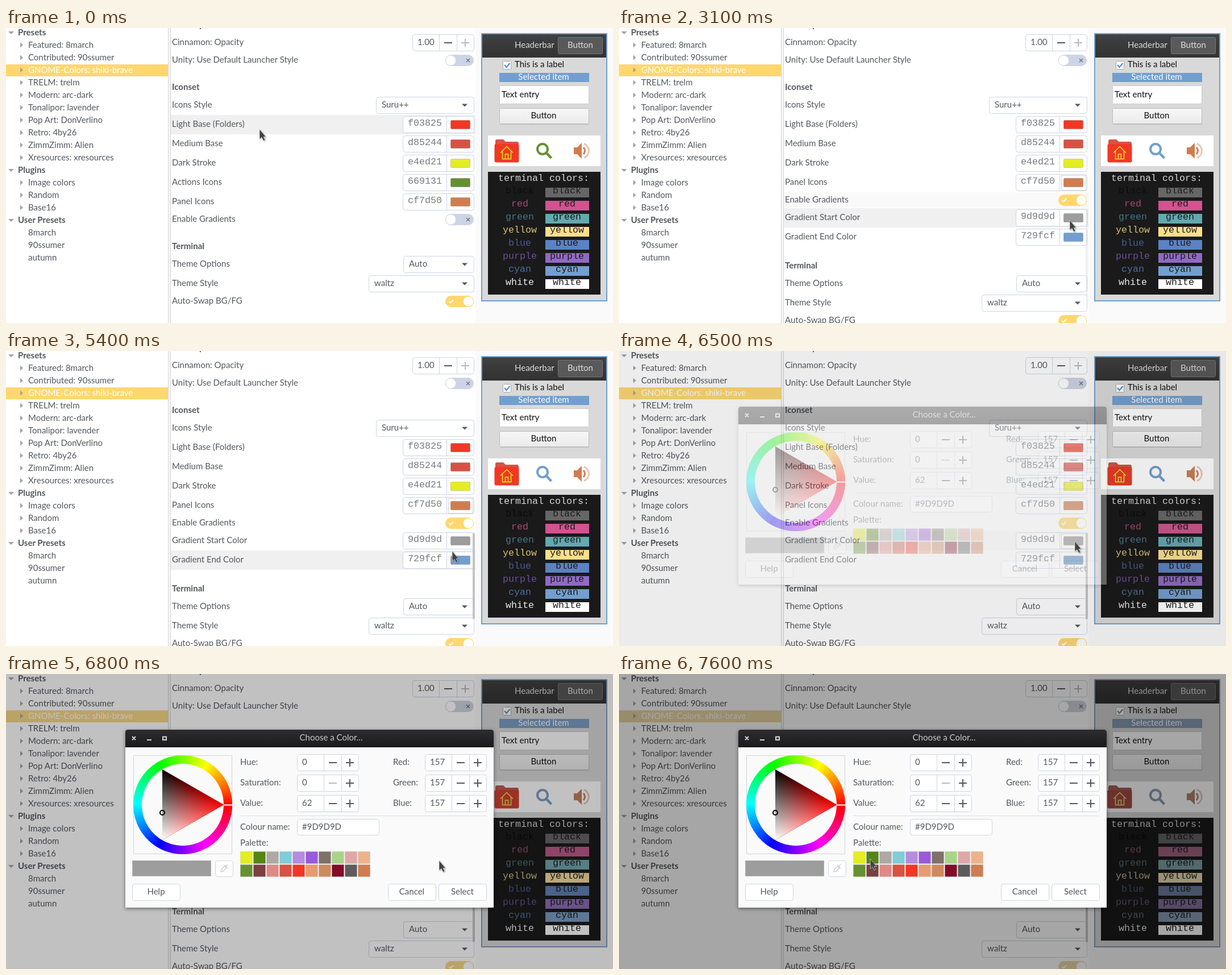
Animation, 1068 px wide and 519 px high, one loop 8000 ms. Source, as an HTML page:

```html
<!DOCTYPE html>
<html lang="en">
<head>
<meta charset="utf-8">
<title>Theme editor</title>
<style>
html, body { margin: 0; width: 100%; height: 100%; overflow: hidden; background: #fff; }
svg { display: block; width: 100vw; height: 100vh; }
text { font: 15px Lato, sans-serif; fill: #54585f; white-space: pre; }
.bold { font-weight: 700; }
.mono { font: 16.67px 'Liberation Mono', monospace; }
.mid { text-anchor: middle; }
#dialog { filter: drop-shadow(0 2px 3px #0007); }
.mix { isolation: isolate; }
.mix :last-child { mix-blend-mode: screen; }
</style>
</head>
<body>
<svg viewBox="0 0 1068 519">
  <defs>
    <linearGradient id="header" x2="0" y2="1"><stop stop-color="#414141"/><stop offset="1" stop-color="#323232"/></linearGradient>
    <linearGradient id="title" x2="0" y2="1"><stop stop-color="#2d2d2f"/><stop offset="1" stop-color="#1b1b1d"/></linearGradient>
    <linearGradient id="button" x2="0" y2="1"><stop stop-color="#f6f6f6"/><stop offset="1" stop-color="#ebebeb"/></linearGradient>
    <linearGradient id="notBlack" gradientUnits="userSpaceOnUse" x1="275" y1="168" x2="329" y2="261"><stop stop-color="#000"/><stop offset="1" stop-color="#f00"/></linearGradient>
    <linearGradient id="white" gradientUnits="userSpaceOnUse" x1="329" y1="199" x2="275" y2="292"><stop stop-color="#000"/><stop offset="1" stop-color="#0ff"/></linearGradient>
  </defs>
  <g id="window"></g>
  <g id="dialog"></g>
  <path id="cursor" d="M0 0V17.5L4 14.5L7 20.5L10 19L7.200 13.500H11.500Z" fill="#434343" stroke="#fff" stroke-opacity=".75" stroke-width=".8" style="filter:drop-shadow(1px 1px 1px #0005)"/>
</svg>
<script>
const LOOP = 8000, STEP = 100, BORDER = '#cdd4e5', ACCENT = '#ffd76e', INK = '#54585f';

// Text is placed by the middle of its capitals.
const text = (x, y, s, cls = '', fill = '') =>
  `<text x="${x}" y="${y + 5}" class="${cls}"${fill && ` style="fill:${fill}"`}>${s}</text>`;
const rect = (x, y, w, h, fill, more = '') =>
  `<rect x="${x}" y="${y}" width="${w}" height="${h}" fill="${fill}" ${more}/>`;
const path = (d, stroke, width = 1, more = '') =>
  `<path d="${d}" fill="none" stroke="${stroke}" stroke-width="${width}" ${more}/>`;
const shape = (d, fill) => `<path d="${d}" fill="${fill}"/>`;
const box = (x, y, w, h = 29) => rect(x + .5, y + .5, w - 1, h, '#fff', `rx="4" stroke="${BORDER}"`);

function spin(x, y, value, minus = INK, plus = INK) {
  return box(x, y, 109) + text(x + 9, y + 14, value)
    + path(`M${x + 47.5} ${y + 1}v28m31 0v-28`, BORDER)
    + path(`M${x + 56} ${y + 15}h14`, minus, 2)
    + path(`M${x + 86} ${y + 15}h14m-7-7v14`, plus, 2);
}

function toggle(y, on) {
  const knob = `<circle cx="${on ? 813.5 : 782.5}" cy="${y}" r="9.200" fill="#fff" stroke="${on ? ACCENT : BORDER}"/>`;
  const mark = on ? path(`M779.500 ${y}l2.500 2.500l5-5`, '#fff', 2) : path(`M810 ${y - 3}l6 6m0-6l-6 6`, '#737884', 1.6);
  return rect(773, y - 10, 50, 20, on ? ACCENT : BORDER, 'rx="10"') + knob + mark;
}

const combo = (x, y, value) => box(x, y - 14, 824 - x) + text(x + 10, y, value)
  + shape(`M802 ${y - 1.5}h10l-5 5z`, INK);

function colorField(y, hex, focused) {
  return box(698, y - 14, 126) + path(`M775.500 ${y - 13}v28`, BORDER)
    + text(707, y - 2, hex, 'mono', '#777a80')
    + rect(782.5, y - 6.5, 34, 15, '#' + hex, 'rx="1.5" stroke="#0000002b"')
    + (focused ? rect(778.5, y - 11.5, 43, 26, 'none', 'stroke="#aaa" stroke-dasharray="1 1"') : '');
}

function sidebar() {
  const tree = {
    Presets: ['Featured: 8march', 'Contributed: 90ssumer', 'GNOME-Colors: shiki-brave', 'TRELM: trelm',
      'Modern: arc-dark', 'Tonalipor: lavender', 'Pop Art: DonVerlino', 'Retro: 4by26',
      'ZimmZimm: Alien', 'Xresources: xresources'],
    Plugins: ['Image colors', 'Random', 'Base16'],
    'User Presets': ['8march', '90ssumer', 'autumn'],
  };
  let y = 8, out = rect(0, 64, 285, 21, ACCENT);
  for (const [heading, items] of Object.entries(tree)) {
    out += shape(`M4 ${y - 2}h10l-5 5z`, '#a0a2a6') + text(21, y, heading, 'bold');
    y += 22;
    for (const item of items) {
      if (heading !== 'User Presets') out += shape(`M25 ${y - 4.5}v9l5-4.500z`, '#a3a4a6');
      out += text(39, y, item, '', item.startsWith('GNOME') ? '#fff' : '');
      y += 22;
    }
  }
  return out + rect(285, 0, 5, 519, '#f6f6f6') + path('M285.500 0v519m4 0v-519', '#d6d6d8');
}

const isOpen = t => t >= 2300;

function optionRows(t) {
  const open = isOpen(t), focus = t < 2100 ? '' : t < 6300 ? 'Panel Icons' : 'Gradient Start Color';
  const color = (label, hex) => ({ label, draw: y => colorField(y, hex, label === focus) });
  const thin = (label, on) => ({ label, thin: true, draw: y => toggle(y + 1, on) });
  const rows = [
    { label: 'Icons Style', draw: y => combo(651, y, 'Suru++') },
    color('Light Base (Folders)', 'f03825'), color('Medium Base', 'd85244'), color('Dark Stroke', 'e4ed21'),
    ...(open ? [] : [color('Actions Icons', '669131')]),
    color('Panel Icons', 'cf7d50'), thin('Enable Gradients', open),
    ...(open ? [color('Gradient Start Color', '9d9d9d'), color('Gradient End Color', '729fcf')] : []),
    { label: 'Terminal', heading: true },
    { label: 'Theme Options', draw: y => combo(699, y, 'Auto') },
    { label: 'Theme Style', draw: y => combo(638, y, 'waltz') },
    thin('Auto-Swap BG/FG', true),
  ];
  let y = 135;
  rows.forEach((row, i) => {
    row.y = y;
    row.top = y - (row.thin ? 13 : 16);
    row.bottom = y + (row.thin ? 14 : 18);
    const next = rows[i + 1];
    y += next?.heading ? (row.thin ? 48 : 51) : row.thin || row.heading || next?.thin ? 31 : 34;
  });
  return rows;
}

function hovered(t) {
  if (t >= 6500) return;
  if (t >= 1700 && t < 3100) return 'Enable Gradients';
  const [x, y] = cursorAt(t);
  if (x > 826) return;
  return optionRows(t).find(r => !r.heading && y >= r.top && y < r.bottom)?.label;
}

function options(t) {
  const now = hovered(t), before = hovered(t - STEP);
  let out = text(292, -6, 'Desktop', 'bold') + text(292, 25, 'Cinnamon: Opacity') + spin(715, 11, '1.00', INK, '#b9bbc0')
    + text(292, 56, 'Unity: Use Default Launcher Style') + toggle(57, false) + text(292, 104, 'Iconset', 'bold');
  for (const row of optionRows(t)) {
    const glow = row.label === now ? 1 : row.label === before ? .4 : 0;
    if (glow) out += rect(290, row.top, 536, row.bottom - row.top, '#f0f0f0', `opacity="${glow}"`);
    out += text(292, row.y, row.label, row.heading ? 'bold' : '') + (row.draw?.(row.y) ?? '');
  }
  const bar = t < 400 || t >= 2300 && t < 3100 ? 0 : t === 400 || t === 3100 ? .25 : 1;
  const [top, height] = isOpen(t) ? [320, 152] : [326, 156];
  return out + rect(821, top, 4, height, '#c3c3c5', `rx="2" opacity="${bar}"`);
}

function preview(t) {
  const action = t < 2400 ? '#669131' : '#729fcf', panel = '#cf7d50';
  let out = rect(826, 0, 242, 519, '#fafafa') + rect(837, 10, 220, 470, '#d9d9d9', 'stroke="#729fcf" stroke-width="2"')
    + rect(838, 11, 218, 41, 'url(#header)') + text(895, 30, 'Headerbar', '', '#dcdcdc')
    + rect(971.5, 16.5, 78, 29, '#595959', 'rx="2" stroke="#777"') + text(1010.5, 30, 'Button', 'mid', '#dcdcdc')
    + rect(874.5, 58.5, 14, 14, '#fff', 'rx="1" stroke="#a8a8a8"') + path('M877 65l3.500 4l6-7', '#5b8fcc', 2.4)
    + text(895, 64, 'This is a label', '', '#111')
    + rect(868, 79, 158, 16, '#729fcf') + text(946, 86, 'Selected item', 'mid', '#fff')
    + rect(868.5, 101.5, 157, 32, '#fff', 'rx="1" stroke="#cacaca"') + text(872, 117, 'Text entry', '', '#111')
    + rect(869, 143, 157, 27, '#0002', 'rx="2"') + rect(868.5, 141.5, 157, 27, 'url(#button)', 'rx="2" stroke="#bdbdbd"')
    + text(946, 154, 'Button', 'mid', '#111') + rect(848, 189, 198, 54, '#fff');
  // Folder, magnifier and speaker icons
  out += shape('M861 212V199q0-3 3-3h11l4 4h20q3 0 3 3v9z', '#d85244') + rect(859.5, 204, 43, 32.5, '#f03825', 'rx="3"')
    + path('M870 219.500l11-11l11 11M873.500 217v13.500h15V217M878.500 230v-8h5v8', '#e4ed21', 1.5)
    + `<circle cx="944" cy="213" r="9" fill="none" stroke="${action}" stroke-width="4"/>` + path('M950 219l9.500 10', action, 4.5)
    + shape('M999 210h6l8-8v28l-8-8h-6z', panel) + path('M1016 210q5 6 0 12', panel, 3)
    + path('M1017 203.500a13.500 13.500 0 0 1 0 25', panel, 3, 'opacity=".45"');

  out += rect(848, 253, 198, 216, '#1a1a1a') + text(946, 264, 'terminal colors:', 'mono mid', '#d6d6d6');
  const colors = [
    ['black', '#0c0c0c', '#666'], ['red', '#a84a74', '#d2538f'], ['green', '#437587', '#62a9b0'],
    ['yellow', '#d9c06f', '#fcdf8a'], ['blue', '#475c90', '#5b82c4'], ['purple', '#6d4f98', '#8f6ac4'],
    ['cyan', '#4c709e', '#729fcf'], ['white', '#ededed', '#fff'],
  ];
  colors.forEach(([name, dim, bright], i) => {
    const y = 287 + 23 * i;
    out += text(904, y - 1, name, 'mono mid' + (i ? '' : ' bold'), dim) + rect(949, y - 6, 77, 17, bright)
      + text(987, y - 1, name, 'mono mid', '#1c1c1c');
  });
  return out;
}

function dialog() {
  let out = shape('M210 411V102q0-4 4-4h640q4 0 4 4v309z', '#fafafa') + shape('M210 129V102q0-4 4-4h640q4 0 4 4v27z', 'url(#title)')
    + text(572, 112, 'Choose a Color...', 'mid', '#c9c9cb')
    + path('M222 110l6 6m0-6l-6 6M248 116h8M276 110.500h6v5.500h-6z', '#d5d5d5', 2)
    + rect(224.5, 143.5, 173, 173, 'none', 'stroke="#aaa" stroke-dasharray="1 1"');
  for (let hue = 0; hue < 360; hue += 3)
    out += `<circle r="79.500" fill="none" stroke="hsl(${hue} 100% 50%)" stroke-width="15" pathLength="360"
      stroke-dasharray="4 356" transform="translate(311 230) rotate(${-hue - 1.5})"/>`;
  const triangle = 'M275 168L383 230L275 292z';
  out += path('M383 230.500h15', '#fff', 2) + `<g class="mix">${shape(triangle, 'url(#notBlack)')}${shape(triangle, 'url(#white)')}</g>`
    + '<circle cx="275" cy="244" r="4" fill="none" stroke="#000" stroke-width="2"/>'
    + rect(222.5, 328.5, 138, 27, '#9d9d9d', 'stroke="#b2b2b2"') + box(368, 328, 32, 28)
    + path('M378 348l1-4l6-6l3 3l-6 6zM384 336l6 6m-3-4l3-3', '#cfcfd2', 1.5);

  const fields = [['Hue:', '0', 'Red:'], ['Saturation:', '0', 'Green:'], ['Value:', '62', 'Blue:']];
  fields.forEach(([label, value, channel], i) => {
    const y = 141 + 36 * i;
    out += text(412, y + 14, label) + spin(512, y, value, i === 1 ? '#b9bbc0' : INK)
      + text(681, y + 14, channel) + spin(737, y, '157');
  });
  out += path('M412 249.500h434', '#dfdfe2') + text(412, 269, 'Colour name:') + box(512, 255, 145, 28) + text(521, 269, '#9D9D9D')
    + text(412, 297, 'Palette:');
  const palette = [
    'e4ed21 558517 b0a8a4 7fcdd8 b48de0 9b59dc 7f706a aad488 dfa8a8 ebb48c',
    '669131 7b4040 df8a86 d85244 f03825 e89a72 cf8a5e 800c28 5c5c5c cf7d50',
  ];
  palette.forEach((line, row) => line.split(' ').forEach((hex, i) => {
    out += rect(412.5 + 23 * i, 312.5 + 23 * row, 21, 21, '#' + hex, 'stroke="#0001"');
  }));
  for (const [x, label] of [[222, 'Help'], [672, 'Cancel'], [761, 'Select']])
    out += box(x, 369, 85) + text(x + 42, 383, label, 'mid');
  return out;
}

// Pointer stops: time, x, y
const stops = [
  [0, 446, 178], [300, 446, 178], [800, 590, 285], [1200, 707, 368], [1300, 770, 354], [1400, 796, 350],
  [1500, 796, 350], [1700, 797, 330], [3000, 797, 330], [3100, 793, 338], [3900, 808, 488], [4400, 950, 260],
  [4800, 1014, 198], [5100, 880, 415], [5400, 785, 352], [5700, 796, 350], [5900, 802, 335], [6600, 802, 335],
  [6800, 762, 328], [7300, 467, 335], [7400, 467, 335], [7600, 442, 325], [LOOP, 442, 325],
];

function cursorAt(t) {
  t = Math.max(t, 0);
  const i = stops.findIndex(stop => stop[0] > t);
  const [t0, x0, y0] = stops[i - 1], [t1, x1, y1] = stops[i];
  const u = (t - t0) / (t1 - t0);
  return [x0 + (x1 - x0) * u, y0 + (y1 - y0) * u];
}

const clamp = v => Math.min(1, Math.max(0, v));
const $ = id => document.getElementById(id);
const fixedPart = sidebar();
$('dialog').innerHTML = dialog();
const start = performance.now();
let shown = -1;

function draw(now) {
  const t = Math.floor(Math.max(0, now - start) % LOOP / STEP) * STEP;
  if (t !== shown) {
    shown = t;
    const u = clamp((t - 6400) / 900), dim = 1 - (1 - u) ** 2;
    $('window').innerHTML = rect(0, 0, 1068, 519, '#fff') + fixedPart + options(t) + preview(t);
    $('window').style.filter = u ? `brightness(${1 - .35 * dim}) saturate(${1 - .5 * u})` : 'none';
    $('dialog').style.opacity = clamp((t - 6400) / 300);
    $('dialog').style.display = u ? '' : 'none';
    $('cursor').setAttribute('transform', `translate(${cursorAt(t)})`);
  }
  requestAnimationFrame(draw);
}
draw(start);
</script>
</body>
</html>
```
